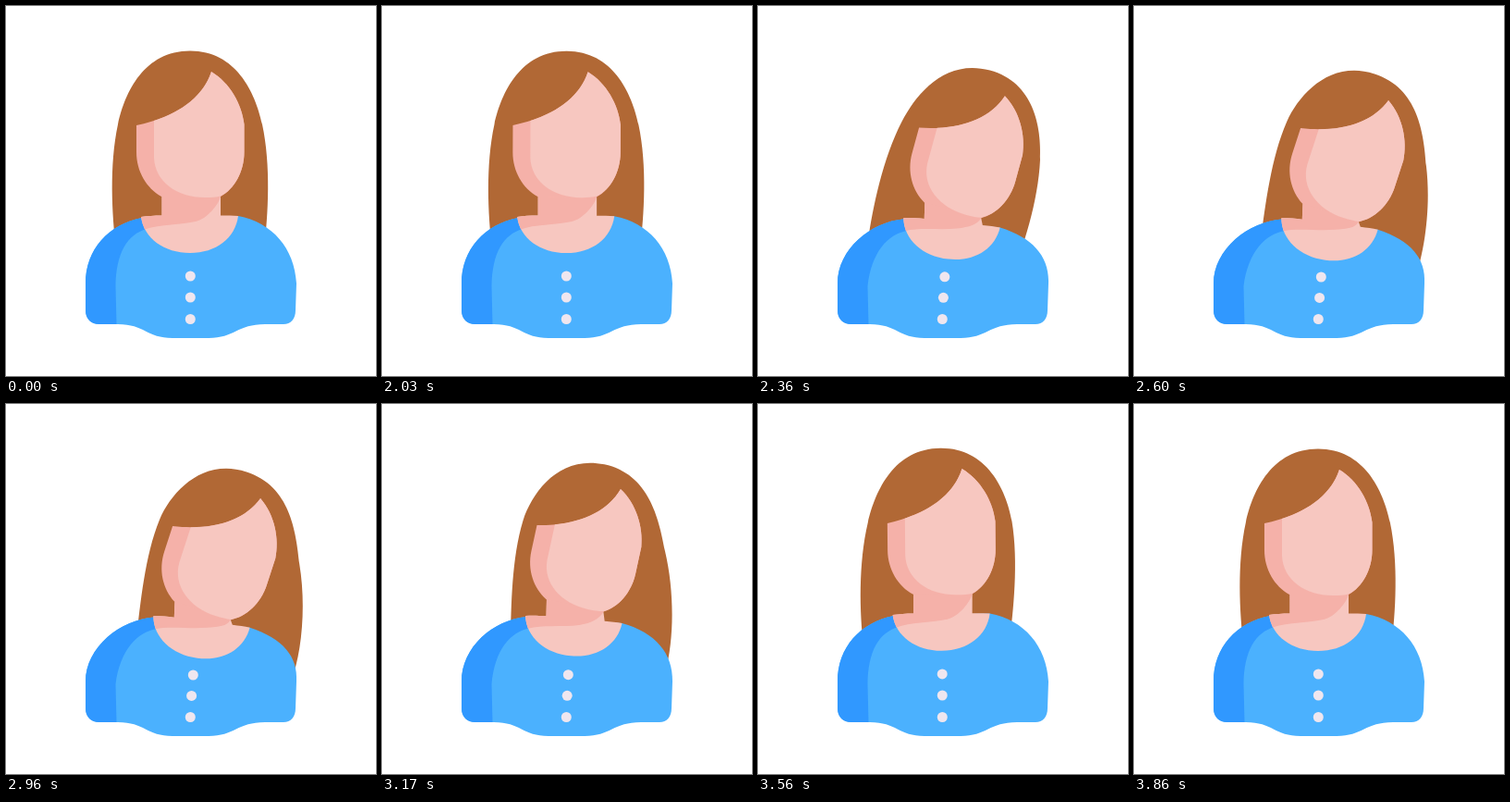
An HTML page that plays this animation: 400 px wide and 400 px high, repeating every 3890 ms.

```html
<!DOCTYPE html>
<html lang="en">
<head>
<meta charset="utf-8">
<title>Head tilt</title>
<style>
  html, body { margin: 0; width: 100%; height: 100%; overflow: hidden; background: #fff; }
  svg { display: block; width: 100%; height: 100%; }
  .hair { fill: #b16835; }
  .skin { fill: #f7c7c0; }
  .shade { fill: #f5b1a9; }
  .shirt { fill: #4bb1fe; }
  .sleeve { fill: #3098ff; }
  .button { fill: #efe6ef; }
</style>
</head>
<body>
<svg id="stage" viewBox="0 0 400 400"></svg>
<script>
const LOOP = 3890;
const stage = document.getElementById('stage');

// [ms, value] keys
const TILT = [[2000, 0], [2480, 1], [3000, 1], [3170, .68], [3380, .11], [3580, -.03], [3890, 0]];
const SWING = [[2300, 0], [2360, 1], [2600, 25], [2760, 31], [3110, 29], [3170, 27],
  [3380, 19], [3660, -14], [3890, 0]];

// Point prefixes: h = head, c = collar, s = shoulder, r = hair; bare points stay put.
const SHAPES = [
  ['hair', `M r119,262 C r114.5,226 r111.5,172 r121,128 C r128.5,93 r149.5,48.5 r199,48.5
    C r248.5,48.5 r269.5,93 r277,128 C r286.5,172 r283.5,226 r279,262 Z`],
  ['shirt', `M c147,229 C c111,236 86,263 86,300 V329 C86,338 92,344 101,344 H121
    C150,344 152,359 180,359 H219 C247,359 250,344 280,344 H300 C308,344 313,338 313,329
    L314,300 C s312,262 c288,234 c251,227 Z`],
  ['sleeve', `M c147,229 C c111,236 86,263 86,300 V329 C86,338 92,344 101,344 H119.5
    L118.5,303 C s119,267 c131,247 c152,241 L c160,232 Z`],
  ['skin', `M h168,200 L h168.5,206 L c168.5,226.5 C c160,226.5 c153,227 c146,228
    C c149,251 c171,267 c199,267 C c227,267 c248,251 c251,227
    C c245,226.5 c239,226.5 c232,226.5 L h232,206 L h232,200 Z`],
  ['shade', `M h168,200 L h168.5,206 L c168.5,226.5 C c160,226.5 c153,227 c146,228
    Q c147,235 c150,241.5 C c165,236 c186,237 c205,233 C c218,230 h230,214 h232,206 L h232,200 Z`],
  ['shade', `M h141,129 L h141,158 C h141,179 h152,197 h168,206 L h232,206
    C h247,198 h257.5,179 h257.5,158 L h257.5,128 C h255,106 h242,83 h222,71
    C h213,99 h185,120 h141,129 Z`],
  ['skin', `M h160,124 L h160,164 C h161,190 h185,207 h215,207 C h222,207 h228,206.5 h232,205.5
    C h247,198 h257.5,179 h257.5,158 L h257.5,128 C h255,106 h242,83 h222,71
    C h214,96 h191,114 h160,124 Z`]
];
const BUTTONS = [[292, 3, 1], [315, 1.3, .4], [338.5, 0, 0]];

function add(tag, cls) {
  const el = document.createElementNS('http://www.w3.org/2000/svg', tag);
  el.setAttribute('class', cls);
  return stage.appendChild(el);
}

const paths = SHAPES.map(([cls, d]) => [add('path', cls), d]);
const buttons = BUTTONS.map(spec => {
  const el = add('circle', 'button');
  el.setAttribute('r', 5.5);
  return [el, spec];
});

// Slope through a key; flat at ends and turning points.
function slope(keys, i) {
  const a = keys[i - 1], b = keys[i], c = keys[i + 1];
  if (!a || !c || (b[1] - a[1]) * (c[1] - b[1]) <= 0) return 0;
  return (c[1] - a[1]) / (c[0] - a[0]);
}

function sample(keys, t) {
  if (t <= keys[0][0]) return keys[0][1];
  const i = keys.findIndex(k => k[0] > t) - 1;
  const [t0, v0] = keys[i], [t1, v1] = keys[i + 1];
  const span = t1 - t0, u = (t - t0) / span, w = 1 - u;
  return v0 * w * w * (1 + 2 * u) + v1 * u * u * (3 - 2 * u)
    + span * (slope(keys, i) * u * w * w - slope(keys, i + 1) * u * u * w);
}

// Straight-line blend from rest to a full turn about (cx, cy).
function turn(cx, cy, deg) {
  const c = Math.cos(deg * Math.PI / 180) - 1, s = Math.sin(deg * Math.PI / 180);
  return (x, y, k) => {
    const dx = x - cx, dy = y - cy;
    return [x + k * (c * dx - s * dy), y + k * (s * dx + c * dy)];
  };
}

const head = turn(151, 254, 18);
const collar = turn(142, 333, 7.3);
const shoulder = (x, y, k) => collar(x, y, k / 2);

function hair(x, y, k, swing) {
  const reach = Math.min(1, Math.max(0, (y - 95) / 143) ** 1.1);
  const side = 1 + .25 * (x - 199) / 83;
  const [hx, hy] = head(x, y, k);
  return [hx + swing * reach * side, hy];
}

const MOVES = { h: head, c: collar, s: shoulder, r: hair };

function draw() {
  const t = performance.now() % LOOP;
  const k = sample(TILT, t), swing = sample(SWING, t);
  for (const [el, d] of paths) {
    el.setAttribute('d', d.replace(/([hcsr])([\d.]+),([\d.]+)/g, (_, m, x, y) =>
      MOVES[m](+x, +y, k, swing).map(n => n.toFixed(2)).join(',')));
  }
  for (const [el, [y, dx, dy]] of buttons) {
    el.setAttribute('cx', 199.3 + dx * k);
    el.setAttribute('cy', y + dy * k);
  }
  requestAnimationFrame(draw);
}
draw();
</script>
</body>
</html>
```
